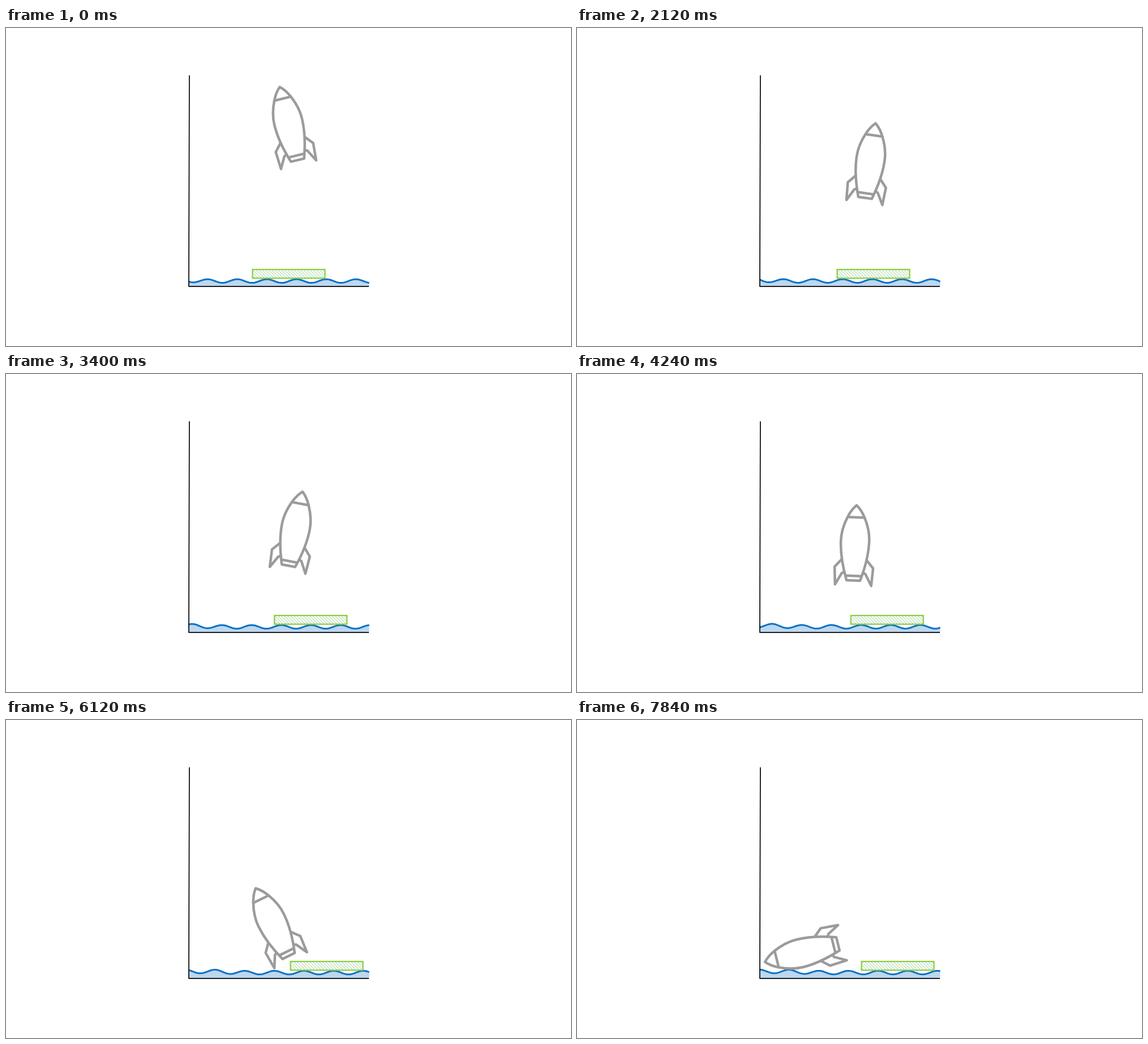
An HTML page that plays this animation: 998x561 px, repeating every 9.85 s.

```html
<!DOCTYPE html>
<html lang="en">
<head>
<meta charset="utf-8">
<title>Rocket landing</title>
<style>
  html, body { margin: 0; width: 100%; height: 100%; overflow: hidden; background: #fff; }
  svg { display: block; width: 100%; height: 100%; }
</style>
</head>
<body>
<svg viewBox="0 0 998 561">
  <defs>
    <pattern id="hatch" width="5.6" height="5.6" patternUnits="userSpaceOnUse">
      <rect width="5.6" height="5.6" fill="#fff"/>
      <path d="M-1.4 -1.4L7 7M-1.4 4.2L1.4 7M4.2 -1.4L7 1.4" stroke="#a5d6a0" stroke-width="1.1"/>
    </pattern>
    <clipPath id="sea"><rect x="323" y="430" width="318.6" height="25.5"/></clipPath>
  </defs>
  <g clip-path="url(#sea)">
    <path id="water" fill="#bdd7ee"/>
    <path id="wave" fill="none" stroke="#0a72c6" stroke-width="3"/>
  </g>
  <path d="M323.9 83.5L322.9 455.8H641" fill="none" stroke="#000" stroke-width="1.7" stroke-linejoin="round"/>
  <g id="raft">
    <rect width="128" height="15.4" fill="url(#hatch)" stroke="#8ccb3f" stroke-width="2.2"/>
  </g>
  <g id="rocket" fill="none" stroke="#9b9b9b" stroke-width="4.5" stroke-linejoin="round" stroke-linecap="round">
    <path d="M0 0Q-9 8 -15 21.3C-20 32 -25 46 -25 63C-25 86 -19 112 -12 132.8H12C19 112 25 86 25 63C25 46 20 32 15 21.3Q9 8 0 0Z"/>
    <path d="M-15 21.3H15M-14 124.6H14"/>
    <path id="fin" d="M-22.4 96.6L-34 110L-32 141L-21 120.8L-16.5 118.4"/>
    <use href="#fin" transform="scale(-1 1)"/>
  </g>
</svg>
<script>
const LOOP = 9850, STEP = 40, END = 7840;
const NOSE = 71; // from the rocket's centre to its nose
const el = id => document.getElementById(id);
const clamp = (v, lo = 0, hi = 1) => Math.min(hi, Math.max(lo, v));

// Keys are [seconds, value].
const driftKeys = [[0, 500.3], [1.04, 510.2], [2.12, 517.5], [3.4, 510.5], [4.24, 490.8], [6.12, 472.1], [7.84, 400.9]];
const fallKeys = [[0, 173], [1.04, 204.9], [2.12, 238.5], [3.4, 277.5], [4.24, 302.5], [6.12, 360.8], [7.84, 409.8]];
const tiltKeys = [[0, -13.7], [1.04, -3.4], [2.86, 16], [4.24, 2.6], [5, -6], [6.12, -26], [7.84, -104]];

function segment(keys, t) {
  let i = 0;
  while (i < keys.length - 2 && t > keys[i + 1][0]) i++;
  const [t0, v0] = keys[i], [t1, v1] = keys[i + 1];
  return { i, v0, v1, span: t1 - t0, u: clamp((t - t0) / (t1 - t0)) };
}

function linear(keys, t) {
  const { v0, v1, u } = segment(keys, t);
  return v0 + (v1 - v0) * u;
}

function slope(keys, i) {
  const a = keys[Math.max(0, i - 1)], b = keys[Math.min(keys.length - 1, i + 1)];
  return (b[1] - a[1]) / (b[0] - a[0]);
}

function smooth(keys, t) {
  const { i, v0, v1, span, u } = segment(keys, t);
  const ease = u * u * (3 - 2 * u);
  return v0 + (v1 - v0) * ease
    + span * u * (1 - u) * ((1 - u) * slope(keys, i) - u * slope(keys, i + 1));
}

function easeInOut(u) {
  return u < 0.5 ? 2 * u * u : 1 - 2 * (1 - u) ** 2;
}

function waveLine(t) {
  const p = easeInOut(clamp((t - 0.4) / 7.1));
  const points = [];
  for (let x = 320; x <= 645; x += 2.5) {
    const m = x - 71 * p;
    const lift = 0.8 * p + 2 * clamp((350 - m) / 45);
    const y = 446.4 - lift - 3.2 * Math.cos((m - 356) / 52.4 * 2 * Math.PI);
    points.push(x + " " + y.toFixed(2));
  }
  return "M" + points.join("L");
}

function draw(ms) {
  const t = Math.min(END, Math.floor(ms / STEP) * STEP) / 1000;
  const line = waveLine(t);
  el("wave").setAttribute("d", line);
  el("water").setAttribute("d", line + "V460H320Z");
  el("raft").setAttribute("transform", `translate(${Math.min(502.5, 435.4 + 11.4 * t)} 426)`);
  el("rocket").setAttribute("transform",
    `translate(${smooth(driftKeys, t)} ${linear(fallKeys, t)}) rotate(${linear(tiltKeys, t)}) translate(0 ${-NOSE})`);
}

const start = performance.now();
function tick() {
  draw((performance.now() - start) % LOOP);
  requestAnimationFrame(tick);
}
tick();
</script>
</body>
</html>
```
